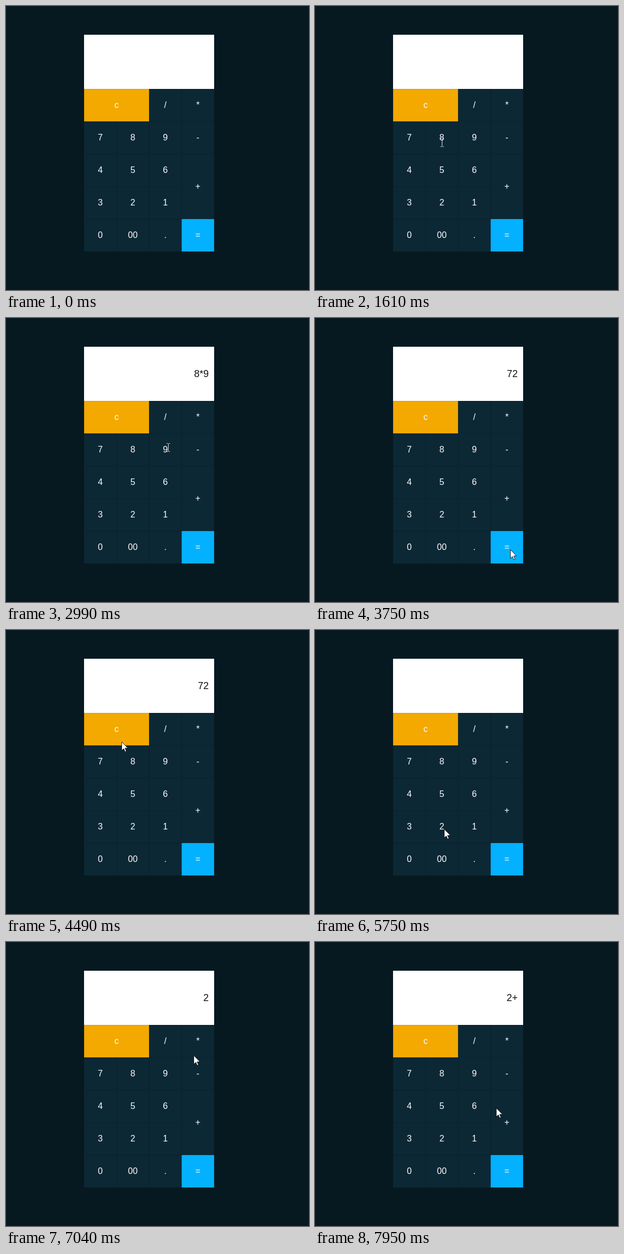
An HTML page that plays this animation: 559 px wide and 524 px high, repeating every 8000 ms.

```html
<!DOCTYPE html>
<html lang="en">
<head>
<meta charset="utf-8">
<title>Calculator</title>
<style>
* { box-sizing: border-box; margin: 0; }
html, body {
  width: 100%; height: 100%; overflow: hidden;
  background: #071920;
  font: 16px "Liberation Sans", Arial, sans-serif;
}
.calc {
  position: absolute; left: 144px; top: 53px;
  display: grid;
  grid-template: 100px repeat(5, 60px) / repeat(4, 60px);
}
.calc span {
  display: grid; place-items: center;
  border: 1px solid rgba(0, 0, 0, .1);
  background: #0c2835; color: #fff;
}
.calc .clear { grid-column: span 2; background: #f3a900; }
.calc .plus { grid-row: span 2; }
.calc .equal { background: #03b1ff; }

/* Each press lasts 140 ms, starting at --at */
.calc .key { animation: press 8s step-end var(--at) infinite; }
@keyframes press {
  0% { background: #74ff3b; color: #111; }
  1.75%, 100% { background: #0c2835; color: #fff; }
}

.display { grid-column: span 4; position: relative; background: #fff; color: #111; font-size: 18px; }
.display b {
  position: absolute; right: 10px; top: 0;
  font-weight: normal; line-height: 100px;
  opacity: 0; animation: 8s step-end infinite;
}
.display b:nth-child(1) { animation-name: first; }
.display b:nth-child(2) { animation-name: times; }
.display b:nth-child(3) { animation-name: product; }
.display b:nth-child(4) { animation-name: result; }
.display b:nth-child(5) { animation-name: second; }
.display b:nth-child(6) { animation-name: sum; }
@keyframes first { 23.5% { opacity: 1; } 31.25%, 100% { opacity: 0; } }
@keyframes times { 31.25% { opacity: 1; } 36.5%, 100% { opacity: 0; } }
@keyframes product { 36.5% { opacity: 1; } 45.25%, 100% { opacity: 0; } }
@keyframes result { 45.25% { opacity: 1; } 59.6%, 100% { opacity: 0; } }
@keyframes second { 77.75% { opacity: 1; } 98.5%, 100% { opacity: 0; } }
@keyframes sum { 98.5%, 100% { opacity: 1; } }

.cursor {
  position: absolute; left: 0; top: 0; width: 1px; height: 1px; overflow: visible;
  animation: travel 8s linear infinite;
}
.arrow { fill: #fff; stroke: #000; stroke-width: .8; animation: arrow 8s step-end infinite; }
.beam { fill: none; stroke: #e2e6e8; opacity: 0; animation: beam 8s step-end infinite; }

@keyframes travel {
  0%, 7.11% { transform: translate(449px, 530px); }
  7.12% { transform: translate(449px, 512px); }
  11.25% { transform: translate(350px, 370px); }
  14.4% { transform: translate(270px, 280px); }
  16.75% { transform: translate(243px, 255px); }
  20.1%, 24.4% { transform: translate(234px, 252px); }
  26.9% { transform: translate(315px, 202px); }
  29.1%, 31.5% { transform: translate(353px, 187px); }
  34.25%, 37.9% { transform: translate(299px, 239px); }
  41.25% { transform: translate(335px, 350px); }
  43.75%, 50.6% { transform: translate(360px, 427px); }
  53.1% { transform: translate(295px, 310px); }
  55.25% { transform: translate(218px, 214px); }
  56.1%, 56.9% { transform: translate(213px, 206px); }
  58% { transform: translate(195px, 191px); }
  59.6%, 60.9% { transform: translate(209px, 189px); }
  66.25% { transform: translate(215px, 300px); }
  69.4% { transform: translate(224px, 368px); }
  71% { transform: translate(236.5px, 368px); }
  71.8%, 78.25% { transform: translate(238px, 367px); }
  82.5% { transform: translate(310px, 270px); }
  85.5% { transform: translate(354px, 204px); }
  88%, 88.9% { transform: translate(346px, 209px); }
  95.1%, 97.5% { transform: translate(347px, 304px); }
  99.3%, 100% { transform: translate(334px, 306px); }
}
/* The pointer becomes a text beam over the key labels */
@keyframes arrow {
  0%, 25.1%, 31.8%, 38.4%, 61.6%, 71.8%, 100% { opacity: 1; }
  18.5%, 29%, 34%, 59.4%, 70.5% { opacity: 0; }
}
@keyframes beam {
  0%, 25.1%, 31.8%, 38.4%, 61.6%, 71.8%, 100% { opacity: 0; }
  18.5%, 29%, 34%, 59.4%, 70.5% { opacity: 1; }
}
</style>
</head>
<body>
<div class="calc">
  <div class="display"><b>8</b><b>8*</b><b>8*9</b><b>72</b><b>2</b><b>2+</b></div>
  <span class="clear">c</span><span>/</span><span class="key" style="--at: 2.36s">*</span>
  <span>7</span><span class="key" style="--at: 1.74s">8</span><span class="key" style="--at: 2.78s">9</span><span>-</span>
  <span>4</span><span>5</span><span>6</span><span class="plus key" style="--at: 7.74s">+</span>
  <span>3</span><span class="key" style="--at: 6.08s">2</span><span>1</span>
  <span>0</span><span>00</span><span>.</span><span class="equal">=</span>
</div>
<svg class="cursor">
  <path class="arrow" d="M.5 .5V16.5L4.2 13L6.8 18.8L9.1 17.8L6.6 12H11.8Z"/>
  <path class="beam" d="M-2.5 -7.5H-.5L.5 -6.5L1.5 -7.5H3.5M.5 -6.5V6.5M-2.5 7.5H-.5L.5 6.5L1.5 7.5H3.5"/>
</svg>
</body>
</html>
```
